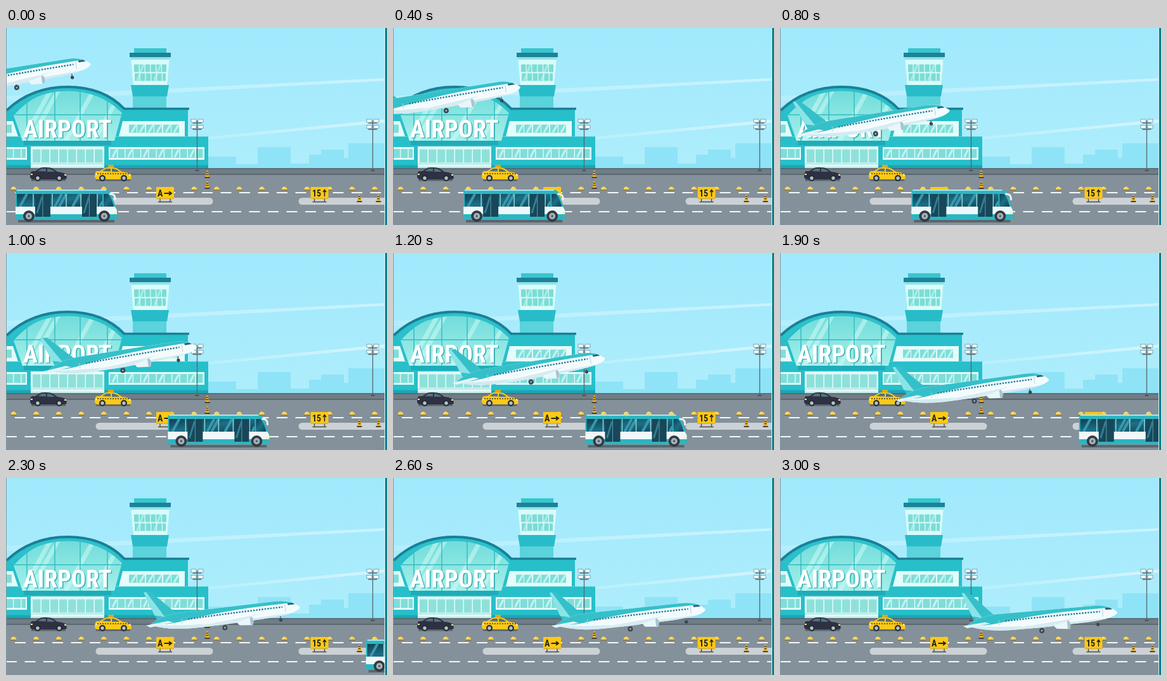
Write an HTML page that moves like this. It is 601 by 311 pixels and loops after 3.1 s.

```html
<!DOCTYPE html>
<html lang="en">
<head>
<meta charset="utf-8">
<title>Airport</title>
<style>
html, body { margin: 0; height: 100%; overflow: hidden; }
svg { display: block; width: 601px; height: 311px; }
text { font-family: "Roboto Condensed", Roboto, sans-serif; font-stretch: 75%; font-weight: 700; }
</style>
</head>
<body>
<svg viewBox="0 0 601 311">
<defs>
  <linearGradient id="sky" x2="0" y2="1"><stop stop-color="#a0e9fd"/><stop offset="1" stop-color="#b4effb"/></linearGradient>
  <linearGradient id="glass" x2="0" y2="1"><stop stop-color="#6fdcda"/><stop offset="1" stop-color="#a5efea"/></linearGradient>
  <linearGradient id="pane" x2="1" y2="1"><stop stop-color="#123f52"/><stop offset=".5" stop-color="#1c6f86"/><stop offset="1" stop-color="#123f52"/></linearGradient>
  <linearGradient id="trail"><stop stop-color="#fff" stop-opacity=".25"/><stop offset="1" stop-color="#fff" stop-opacity=".7"/></linearGradient>
  <clipPath id="dome"><path id="arch" d="M12 138Q48 97 97 97T183 134L171 178H26Z"/></clipPath>
  <g id="lamp">
    <path d="M0 146V225M-7 150H7M-7 160H7" stroke="#52666f" stroke-width="1.3"/>
    <path d="M-3 225H3" stroke="#46545c" stroke-width="2"/>
    <path d="M-9.500 144h8v5h-8zM1.500 144h8v5h-8zM-9.500 153.500h8v5h-8zM1.500 153.500h8v5h-8z" fill="#f4fcfd" stroke="#6f8f98" stroke-width=".8"/>
  </g>
  <g id="cone">
    <path d="M-4 0H4V-2H-4Z" fill="#4a4030"/>
    <path d="M-3-2L-1-12H1L3-2Z" fill="#f5b921"/>
    <path d="M-2-5.500H2M-1.500-9H1.500" stroke="#4f3b1f" stroke-width="1.500"/>
  </g>
  <g id="beacon">
    <path d="M-4.500 2a4.500 5 0 0 1 9 0z" fill="#fbd24e"/>
    <path d="M-5 2.500H5" stroke="#8c7440" stroke-width="1.500"/>
    <path d="M-2.500 0q0-2 2.500-2" fill="none" stroke="#fff0a8"/>
  </g>
  <g id="sign">
    <path d="M-8 18v5M8 18v5M-11 23.500H11" stroke="#4c4d42" stroke-width="1.400"/>
    <rect x="-14" width="28" height="18.500" rx="1" fill="#fdc914"/>
    <path d="M-14 18H14" stroke="#d6a00f"/>
  </g>
  <g id="wheel"><circle r="9" fill="#343b43"/><circle r="5" fill="#a9b6bd"/><circle r="2" fill="#5b6870"/></g>
  <g id="tyre"><circle r="5" fill="#272d34"/><circle r="2.700" fill="#b7c2c8"/></g>
  <g id="car">
    <path d="M2 21H56" stroke="#59656d" stroke-width="3"/>
    <path d="M0 17Q0 8 3 7L8 7 16 2Q18 1 24 1 33 1 36 3L43 8Q55 9 57 13L58 18Q57 20 54 20H3Z"/>
    <path d="M12 7L18 3H25V7.500ZM27 3Q34 3 39 8H27Z" fill="#53717f"/>
    <path d="M54 13h3M1 12h3" stroke="#f5e9b0" stroke-width="2"/>
    <use href="#tyre" x="12" y="18"/><use href="#tyre" x="46" y="18"/>
  </g>
</defs>

<rect width="601" height="311" fill="url(#sky)"/>
<g fill="url(#trail)">
  <path d="M0 107L190 99 601 79V83L190 106 0 115Z" opacity=".6"/>
  <path d="M318 172L601 144V149L318 176Z" opacity=".7"/>
</g>
<path d="M318 222V203H363V215H397V188H449V214H478V200H497V192H533V205H540V182H598V222Z" fill="#8fe3f6"/>

<!-- tower -->
<path d="M202 32H253V40H202Z" fill="#38c6cd"/>
<path d="M195 39H260V46H195Z" fill="#1d8299"/>
<path d="M197 46H258L254 91H201Z" fill="#d9fbfa"/>
<path d="M197 46H258V50H197Z" fill="#8fe4e6"/>
<path d="M202 63.500H253M203 77.500H252" stroke="#7cdcd6" stroke-width="12" stroke-dasharray="7.500 1.300"/>
<path d="M207 83L217 57M234 83L244 57" stroke="#c9f8f1" stroke-width="3" opacity=".6"/>
<path d="M197 90H257L254 108H200Z" fill="#28bcc9"/>
<path d="M200 108H253V127H200Z" fill="#5ad3da"/>

<!-- terminal -->
<path d="M182 128H287V172H319V222H0V130Q42 93 97 93T188 129Z" fill="#27bfca"/>
<path d="M186 127.500H289" stroke="#1b7f96" stroke-width="3.500"/>
<path d="M0 171.500H319" stroke="#53d3d7" stroke-width="1"/>
<path d="M0 147H11L19 171H0ZM184 147H282V171H178Z" fill="#e4fcfb"/>
<path d="M194 159H274M0 159H9" stroke="#80ddd8" stroke-width="13" stroke-dasharray="12 1 12 2"/>
<path d="M198 165l7-12M211 165l7-12M225 165l7-12M238 165l7-12M252 165l7-12M265 165l7-12" stroke="#c2f5f0" stroke-width="3"/>
<use href="#arch" fill="url(#glass)"/>
<g clip-path="url(#dome)">
  <path d="M26 178L74 92M38 178L86 92M94 178L142 92M139 178L187 92" stroke="#d5fbf6" stroke-width="7" opacity=".5"/>
  <path d="M33 95V178M77 95V178M117 95V178M160 95V178M0 137H190" stroke="#35bcc1" stroke-width="1.500"/>
</g>
<path d="M1 130Q40 93 97 93T187 128" fill="none" stroke="#1b7f96" stroke-width="4"/>
<path d="M7 134Q45 97.500 97 97.500T184 132" fill="none" stroke="#2ec1cb" stroke-width="4"/>
<path d="M28 178H166V185H28Z" fill="#1fabb9"/>
<path d="M39 187H155V222H39ZM0 188H33V208H0ZM162 188H313V208H162Z" fill="#e4fcfb"/>
<path d="M42 202H153" stroke="#8ee1da" stroke-width="21" stroke-dasharray="12.500 1.500"/>
<path d="M39 214.500H155M39 220H155" stroke="#c4ebea" stroke-width="3"/>
<path d="M0 198H31M164 198H312" stroke="#80ddd8" stroke-width="14" stroke-dasharray="11 1.300"/>
<path d="M168 204l6-12M192.500 204l6-12M217 204l6-12M241.500 204l6-12M266 204l6-12M290.500 204l6-12" stroke="#c2f5f0" stroke-width="3"/>
<path d="M0 219H39M155 219H319" stroke="#19a6b5" stroke-width="5"/>
<g font-size="38" text-anchor="middle">
  <text x="98.500" y="174" fill="#35a9b2">AIRPORT</text>
  <text x="97" y="173" fill="#fff">AIRPORT</text>
</g>

<!-- apron -->
<rect y="222" width="601" height="89" fill="#84919a"/>
<rect y="222" width="601" height="9" fill="#717d86"/>
<path d="M0 222H601M0 231H601" stroke="#515d66" stroke-width="1.500"/>
<path d="M14 260H598M0 290H598" stroke="#f4f7f8" stroke-width="2" stroke-dasharray="17 12.500"/>
<path d="M147 273.500H321M467 273.500H601" stroke="#cbd1d5" stroke-width="11" stroke-linecap="round"/>
<use href="#lamp" x="301.500"/><use href="#lamp" x="578.500"/>
<use href="#car" x="38" y="219" fill="#2d3142"/>
<path d="M161 220v-4h9v4z" fill="#e0a813"/>
<use href="#car" x="140" y="219" fill="#fbc916"/>
<path d="M144 230H194" stroke="#3d3b32" stroke-width="1.500" stroke-dasharray="2 2"/>
<g id="beacons"></g>
<use href="#cone" x="317.500" y="237"/><use href="#cone" x="317.500" y="254"/>
<use href="#cone" x="557.500" y="275"/><use href="#cone" x="587.500" y="275"/>
<g font-size="14" fill="#24231d">
  <use href="#sign" x="251" y="251"/>
  <text x="239" y="265.500">A</text>
  <path d="M249.500 261H260M257 258l4 3-4 3" fill="none" stroke="#24231d" stroke-width="1.800"/>
  <use href="#sign" x="494.500" y="251"/>
  <text x="483" y="265.500">15</text>
  <path d="M502.500 266V256M500 259l2.500-3.500 2.500 3.500" fill="none" stroke="#24231d" stroke-width="1.500"/>
</g>

<!-- origin: main landing gear -->
<g id="plane">
  <path d="M0-10V0M89-10V-3" stroke="#71828c" stroke-width="2"/>
  <circle r="4" fill="#3c464f"/><circle r="1.500" fill="#9daab1"/>
  <circle cx="89" cy="-2" r="2.700" fill="#3c464f"/>
  <path d="M-104-22L-121-70H-110L-73-31Z" fill="#35c0c9"/>
  <path d="M-108-32L-121-70H-117L-92-28Z" fill="#8be3e6"/>
  <path d="M-117-18Q-100-30-70-32H86Q109-32 121-19 122-15 108-11 94-8 70-7L0-5H-47Q-90-6-117-18Z" fill="#f3fbfd"/>
  <path d="M-117-18Q-100-30-70-32H86Q100-32 110-27L70-27Q0-27-58-19-90-14-117-18Z" fill="#35c0c9"/>
  <path d="M-117-18Q-90-6-47-5H0L70-7Q94-8 108-11L20-9Q-60-8-117-18Z" fill="#d3eaf1"/>
  <path d="M-56-20Q0-22 94-22" fill="none" stroke="#257c98" stroke-width="2.400" stroke-dasharray="2.500 2"/>
  <path d="M102-27H110L114-24H103Z" fill="#24627b"/>
  <path d="M98-26V-14M-66-22V-14" stroke="#b4d2dc"/>
  <path d="M-123-18L-88-21-80-18-117-14Z" fill="#e3f3f8"/>
  <path d="M22-12H44Q48-6 44 1L24-1Q18-5 22-12Z" fill="#e9f6fa"/>
  <path d="M41-12H44Q48-6 44 1L41 0Z" fill="#a7c4d0"/>
  <path d="M55-15L20-17-39-8-37-5 26-8Z" fill="#d8ebf2"/>
  <path d="M55-15L20-17-39-8Z" fill="#f9feff"/>
</g>

<!-- origin: rear end of the roof line -->
<g id="bus">
  <path d="M4 51H156" stroke="#59656d" stroke-width="4"/>
  <path d="M0 4Q0 1 4 1H143Q150 2 153 14L160 33V46Q160 48 157 48H0Z" fill="#2bb6c2"/>
  <path d="M2 2H143" stroke="#d9f3f5" stroke-width="1.500"/>
  <path d="M2 8H137V28H2Z" fill="url(#pane)"/>
  <path d="M7 28l11-20M62 28l11-20M69 28l11-20M90 28l11-20M133 28l4-8" stroke="#3a98ab" stroke-width="4"/>
  <path d="M28 8V28M58 8V28M80 8V28M103 8V28M129 8V28" stroke="#8fd6dc" stroke-width="1.500"/>
  <path d="M0 28H157L160 34V40H0Z" fill="#eef8fa"/>
  <path d="M31 8H55V44H31ZM105 8H128V44H105Z" fill="#174759"/>
  <path d="M43 8V44M116.500 8V44" stroke="#5f9fad"/>
  <path d="M34 38l8-26M108 38l8-26" stroke="#2f7f94" stroke-width="3"/>
  <path d="M139 8H146Q151 12 155 28H139Z" fill="url(#pane)"/>
  <path d="M148 8Q158 7 157 18" fill="none" stroke="#e6f3f5" stroke-width="3"/>
  <path d="M155 36h4v4h-4z" fill="#fff3b0"/>
  <use href="#wheel" x="21" y="43"/><use href="#wheel" x="140" y="43"/>
</g>

<path d="M.5 0V311" stroke="#7a98a2"/>
<path d="M597.500 0V311" stroke="#d8f4f7"/>
<path d="M598 0H601V311H598Z" fill="#087f89"/>
</svg>
<script>
const LOOP = 3100, STEP = 100, TOUCHDOWN = 1500, LAST = 3000;
const $ = id => document.getElementById(id);
const mix = (a, b, k) => a + (b - a) * k;

$("beacons").innerHTML = Array.from({ length: 17 }, (_, i) =>
  `<use href="#beacon" x="${12 + i * 35.6}" y="253.5"/>`).join("");

// Straight descent, then a slow roll while the nose comes down.
function planePose(t) {
  if (t < TOUCHDOWN) {
    const k = t / TOUCHDOWN;
    return [mix(17, 268, k), mix(94, 231, k), -9];
  }
  const k = (t - TOUCHDOWN) / (LAST - TOUCHDOWN);
  return [mix(268, 413, k), mix(231, 241, k), mix(-8.5, -5, k)];
}

function draw(now) {
  const t = Math.floor(now % LOOP / STEP) * STEP;
  const [x, y, angle] = planePose(t);
  $("plane").setAttribute("transform", `translate(${x} ${y}) rotate(${angle})`);
  $("bus").setAttribute("transform", `translate(${15 + t * 0.2404} 254)`);
  requestAnimationFrame(draw);
}
draw(0);
</script>
</body>
</html>
```
